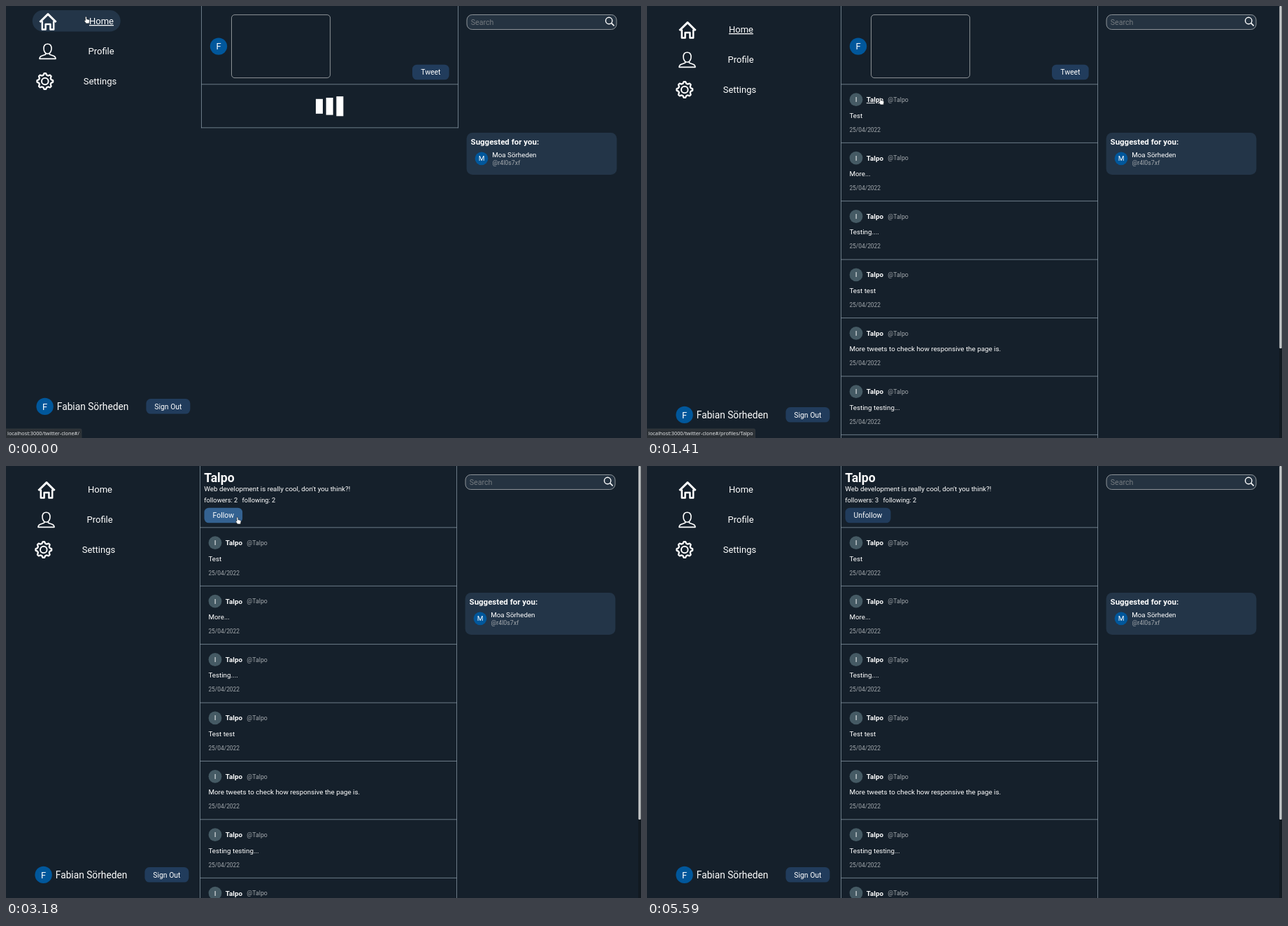
These frames come from a looping animation (908x617 px, 5.77 s). An HTML page:

```html
<!DOCTYPE html>
<html lang="en">
<head>
<meta charset="utf-8">
<title>Social feed</title>
<style>
  html, body { margin: 0; width: 100%; height: 100%; overflow: hidden; background: #15202b; }
  svg { display: block; font-family: Roboto, Arial, sans-serif; }
  text { fill: #fff; }
  .dim { fill: #a3a8ad; }
  .line { fill: #8899a6; }
  .icon { fill: none; stroke: #fff; stroke-linejoin: round; }
  .field { stroke: #b4b8bb; stroke-width: .75; }
  .under { text-decoration: underline; }
  #status text { font-family: "Noto Sans", sans-serif; fill: #e4e6e8; }
</style>
</head>
<body>
<svg id="stage" width="908" height="617" viewBox="0 0 908 617"></svg>
<script>
const LOOP = 5770;
const BLUE = '#01579b', PANEL = '#233548', BUTTON = ['#213c5c', '#2a4f77', '#346291'];
const USER = 'Talpo';
const POSTS = ['Test', 'More...', 'Testing....', 'Test test',
  'More tweets to check how responsive the page is.', 'Testing testing...', 'Test'];

const text = (x, y, size, str, attrs = '') =>
  `<text x="${x}" y="${y}" font-size="${size}" ${attrs}>${str}</text>`;
const rect = (x, y, w, h, r, attrs) =>
  `<rect x="${x}" y="${y}" width="${w}" height="${h}" rx="${r}" ${attrs}/>`;
const path = (d, width) => `<path class="icon" d="${d}" stroke-width="${width}"/>`;
const group = (id, body) => `<g id="${id}">${body}</g>`;
const THIN = .75;
const across = y => rect(277.2, y, 367.6, THIN, 0, 'class="line"');
const columns = h => [277.2, 644.1].map(x => rect(x, 0, THIN, h, 0, 'class="line"')).join('');
const avatar = (x, y, r, letter, fill) =>
  `<circle cx="${x}" cy="${y}" r="${r}" fill="${fill}"/>` +
  text(x, y + r * .38, r * 1.06, letter, 'text-anchor="middle"');
const button = (x, y, w, label) =>
  rect(x, y, w, 21.6, 6.5, `fill="${BUTTON[0]}"`) +
  text(x + w / 2, y + 14.5, 10.4, label, 'text-anchor="middle"');

function gear(cx, cy) {
  const points = [];
  for (let i = 0; i < 32; i++) {
    const a = (i - 1.5) / 32 * 2 * Math.PI;
    const r = i % 4 === 1 || i % 4 === 2 ? 11.4 : 9;
    points.push((cx + r * Math.cos(a)).toFixed(2) + ' ' + (cy + r * Math.sin(a)).toFixed(2));
  }
  return path(`M${points.join('L')}Z`, 2.3) +
    `<circle class="icon" cx="${cx}" cy="${cy}" r="4.8" stroke-width="2"/>`;
}

function feed(top) {
  return POSTS.map((post, i) => {
    const y = top + 83.4 * i;
    return across(y + .2) +
      avatar(299, y + 22.4, 9.4, 'I', '#455a64') +
      text(313.8, y + 25.9, 9.8, USER, 'class="name" font-weight="700"') +
      text(344.3, y + 25.7, 8.8, '@' + USER, 'class="dim"') +
      text(289.4, y + 48.2, 9.8, post) +
      text(289.4, y + 68.2, 8.4, '25/04/2022', 'class="dim"');
  }).join('') + columns(617);
}

const loader = y =>
  across(y + .2) + across(y + 62.2) + columns(y + 63) +
  rect(441, y + 21.5, 10, 21, 0, 'fill="#fff"') +
  rect(455.7, y + 19.7, 10, 24.6, 0, 'fill="#fff"') +
  rect(470.4, y + 17.8, 10, 28.2, 0, 'fill="#fff"');

const nav = group('nav',
  rect(35.7, 18, 126, 30.6, 15.3, `id="pill" fill="${PANEL}"`) +
  path('M46.4 35L58 23.6L69.6 35', 3) +
  path('M49.8 33.5V45.4H54.6V38H61.4V45.4H66.2V33.5', 2.5) +
  path('M57.5 66.3C53.6 66.3 52 69.4 52 72.8C52 76.6 54.2 80.2 57.5 80.2S63 76.6 63 72.8C63 69.4 61.4 66.3 57.5 66.3Z', 1.6) +
  path('M54.6 79.2V81.2L49 83.2Q46 84.3 46 87.4H69Q69 84.3 66 83.2L60.4 81.2V79.2', 1.6) +
  gear(53.8, 119.5) +
  text(117, 38, 13, 'Home', 'id="home-link"') +
  text(115.5, 81, 13, 'Profile') +
  text(108.7, 124, 13, 'Settings') +
  avatar(53.6, 583.9, 12.2, 'F', BLUE) +
  text(70.8, 588.8, 13.75, 'Fabian Sörheden') +
  button(198.4, 573, 63, 'Sign Out'));

const side =
  rect(657, 12.5, 214, 21, 7.5, 'class="field" fill="#253341"') +
  text(662.8, 27, 10.6, 'Search', 'style="fill:#757b80"') +
  '<circle class="icon" cx="860.2" cy="21" r="4.7" stroke-width="1.4"/>' +
  path('M863.6 24.4L867.6 28.4', 1.6) +
  rect(656.6, 181, 214.8, 60, 8.5, `fill="${PANEL}"`) +
  text(662.6, 197.7, 11.47, 'Suggested for you:', 'font-weight="700"') +
  avatar(678, 217.8, 9.4, 'M', BLUE) +
  text(693.2, 216.1, 9.8, 'Moa Sörheden') +
  text(693.4, 226.6, 8.8, '@r4l0s7xf', 'class="dim"');

const form = group('form',
  avatar(302, 57.6, 12.2, 'F', BLUE) +
  rect(320.5, 12.6, 141.1, 90, 4.5, 'class="field" fill="none"') +
  button(579, 83.7, 52.6, 'Tweet'));

const profile = group('profile',
  text(283.2, 22.7, 17.64, USER, 'font-weight="700"') +
  text(283.3, 36.3, 9.8, "Web development is really cool, don't you think?!") +
  text(283.3, 52.2, 9.3, '', 'id="followers"') +
  text(337.6, 52.2, 9.3, 'following: 2') +
  group('follow', button(283.5, 59.7, 65, 'Unfollow')) +
  feed(87.3));

const status = group('status',
  rect(-2, 604, 110, 15, 1.5, 'fill="#2c3136" stroke="#3c4146" stroke-width=".6"') +
  text(2, 613.2, 7.3, ''));

const $ = id => document.getElementById(id);
$('stage').innerHTML =
  group('shell', nav + side + form + group('home', feed(111.3)) + profile +
    group('load-home', loader(111.3)) + group('load-profile', loader(0))) +
  group('scroll', rect(904.2, 0, 3.8, 617, 0, 'fill="#111920"') +
    rect(904.3, 0, 3.4, 489, 1, 'fill="#c3c6c8"')) +
  status +
  '<path id="cursor" fill="#fff" stroke="#10161c" stroke-width=".6"/>';

const ARROW = 'M0 0V9.6L2.2 7.6L3.8 11L5.4 10.3L3.9 7H6.9Z';
const HAND = 'M1.3 1.2Q1.4 0 2.3 .1T3.4 1.4V3.7L6.6 4.4Q7.8 4.8 7.5 6.4L6.9 9.9H2.5L.1 6.4Q.2 5 1.6 5.6Z';

// time, x, y, hand
const MOVES = [
  [0, 112, 15, 1], [590, 165, 58], [650, 226, 95], [710, 274.6, 119.3],
  [770, 296, 127], [830, 309, 131], [890, 317, 133], [950, 323, 134],
  [1000, 327, 134], [1060, 331, 133], [1120, 333, 132], [1180, 332, 131.5, 1],
  [1410, 331.3, 131, 1], [1590, 333.2, 132], [2590, 314.5, 109],
  [2760, 337, 78, 1], [2880, 333, 75, 1], [3060, 328.5, 73, 1],
  [3350, 342.5, 75.5], [3530, 429, 127], [3710, 430, 138.6], [3880, 365.5, 102],
  [4120, 339, 78, 1], [4240, 334, 75, 1], [4410, 347, 84], [4650, 446.6, 147.5],
  [4820, 447.5, 151.6], [5000, 367, 102.5], [5240, 95.5, 5.5], [5410, 43, -9],
  [5590, -20, -20]
];

const within = (t, a, b) => t >= a && t < b;
const show = (id, on) => $(id).setAttribute('display', on ? 'inline' : 'none');
const clamp = v => Math.max(0, Math.min(1, v));

function drawStatus(t) {
  const onName = t >= 1180;
  const opacity = t >= 2060 ? 0 : onName ? clamp((t - 1120) / 180) : clamp(1 - (t - 650) / 180);
  const [box, label] = $('status').children;
  box.setAttribute('width', onName ? 156.5 : 110);
  label.textContent = 'localhost:3000/twitter-clone#/' + (onName ? 'profiles/' + USER : '');
  $('status').setAttribute('opacity', opacity);
}

function drawFollow(t) {
  const followed = !within(t, 3180, 4410);
  const hover = within(t, 2880, 3530) || within(t, 4240, 4650) ? 2
    : within(t, 2760, 2880) || within(t, 4120, 4240) ? 1 : 0;
  const width = followed ? 65 : 54.6;
  const [box, label] = $('follow').children;
  box.setAttribute('width', width);
  box.setAttribute('fill', BUTTON[hover]);
  label.setAttribute('x', 283.5 + width / 2);
  label.textContent = followed ? 'Unfollow' : 'Follow';
  $('followers').textContent = 'followers: ' + (followed ? 3 : 2);
}

function draw(t) {
  const loadHome = t < 290, loadProfile = within(t, 1590, 2060);
  const loading = loadHome || loadProfile, onHome = t < 1590;
  $('shell').setAttribute('transform', `translate(${loading ? 2 : 0} 0)`);
  $('nav').setAttribute('transform', `translate(0 ${loading ? -12 : 0})`);
  show('pill', loadHome);
  show('load-home', loadHome);
  show('load-profile', loadProfile);
  show('form', onHome);
  show('home', onHome && !loading);
  show('profile', t >= 2060);
  show('scroll', !loading);
  $('scroll').lastChild.setAttribute('height', onHome ? 489 : 505);
  $('home-link').classList.toggle('under', onHome);
  $('home').querySelector('.name').classList.toggle('under', within(t, 1180, 1590));
  drawStatus(t);
  drawFollow(t);
  const [, x, y, hand] = MOVES.findLast(m => m[0] <= t);
  $('cursor').setAttribute('d', hand ? HAND : ARROW);
  $('cursor').setAttribute('transform', `translate(${x} ${y})`);
}

function tick() {
  draw(performance.now() % LOOP);
  requestAnimationFrame(tick);
}
tick();
</script>
</body>
</html>
```
